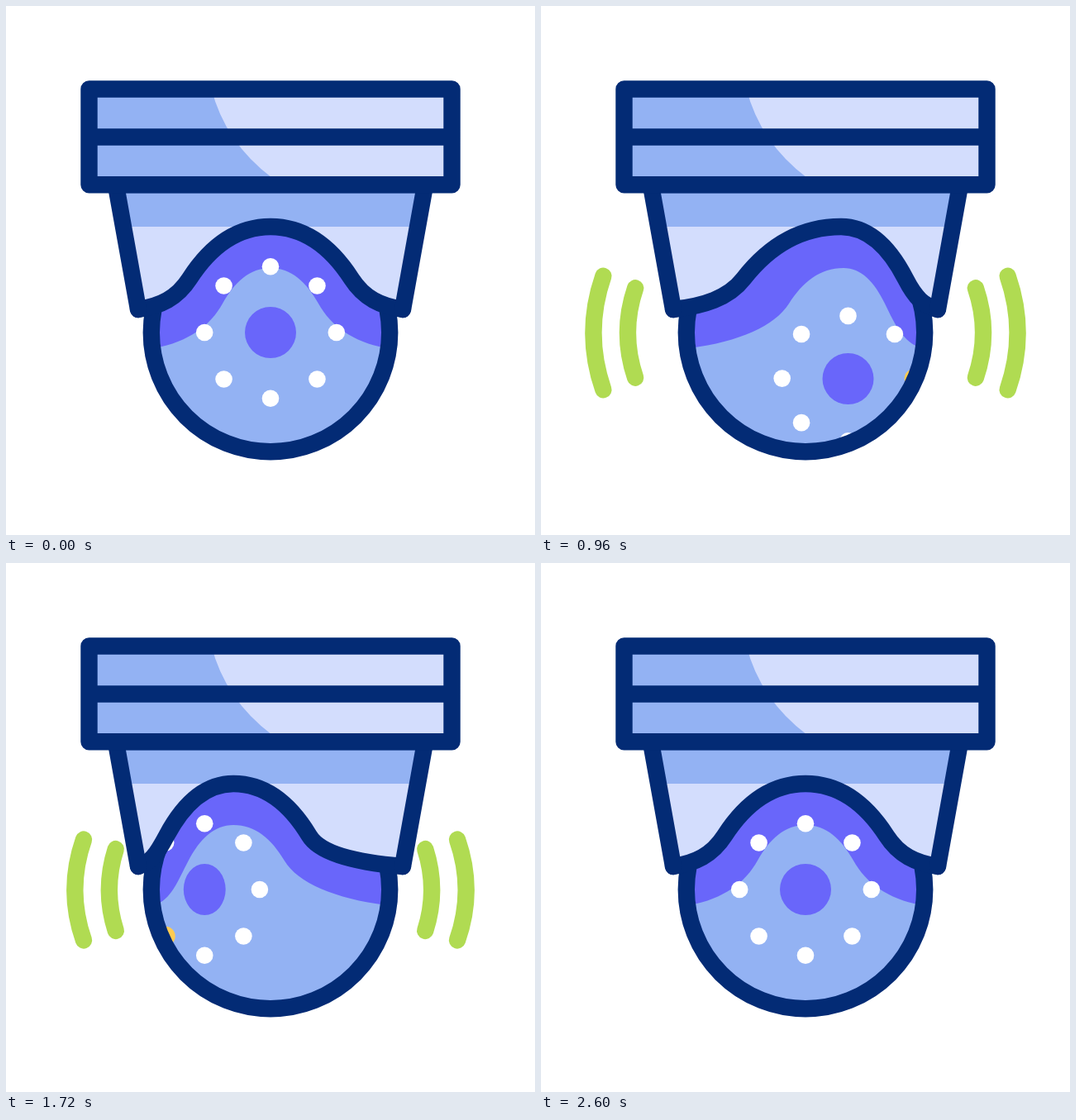
Recreate the animation shown at these times as an HTML page with a canvas. Size 640 by 640 pixels, loop 3000 ms.

```html
<!DOCTYPE html>
<html>
<head>
<meta charset="utf-8">
<style>
  html, body { margin: 0; width: 100%; height: 100%; overflow: hidden; background: #fff; }
  canvas { display: block; }
</style>
</head>
<body>
<canvas id="stage" width="640" height="640"></canvas>
<script>
const ctx = document.getElementById('stage').getContext('2d');
const LOOP = 3000, CX = 320, CY = 395, LINE = 20.4;
const NAVY = '#032b75', BLUE = '#93b2f3', PALE = '#d3ddfd', PURPLE = '#6966fa', GREEN = '#b0db52';
const WHITE = [255, 255, 255], YELLOW = [255, 203, 80];

const clamp = v => Math.min(1, Math.max(0, v));
const ease = (t, from, to) => { const s = clamp((t - from) / (to - from)); return s * s * (3 - 2 * s); };
const hold = (t, a, b, c, d) => ease(t, a, b) - ease(t, c, d);

// A bell-shaped curve: flat feet, two sloping flanks and a round apex.
function bell({ foot, footY, lift, reach, mid, half, flankY, rise, drop, apex, apexY }) {
  const path = new Path2D();
  const x1 = mid - half, x2 = mid + half, end = 640 - foot;
  const a = apex - x1, b = x2 - apex, lean = 0.25;
  path.moveTo(foot, footY);
  path.bezierCurveTo(foot + reach * (x1 - foot), footY - lift,
    x1 - lean * a * drop, flankY + rise * drop, x1, flankY);
  path.bezierCurveTo(x1 + lean * a, flankY - rise, apex - 0.43 * a, apexY, apex, apexY);
  path.bezierCurveTo(apex + 0.43 * b, apexY, x2 - lean * b, flankY - rise, x2, flankY);
  path.bezierCurveTo(x2 + lean * b * drop, flankY + rise * drop,
    end - reach * (end - x2), footY - lift, end, footY);
  return path;
}

const hillCurve = (right, left) => bell({
  foot: 160, footY: 367, lift: 4, reach: 0.43,
  mid: CX + 23 * right - 44 * left, half: 98 - 13 * left, flankY: 330, rise: 38, drop: 0.62,
  apex: CX + 43 * right - 50 * left, apexY: 267
});

const glassCurve = (right, left) => bell({
  foot: 180, footY: 414, lift: 8, reach: 0.5,
  mid: CX + 38 * right - 46 * left, half: 58, flankY: 360, rise: 26, drop: 1.05,
  apex: CX + 46 * right - 50 * left, apexY: 317
});

function below(curve) {
  const area = new Path2D(curve);
  area.lineTo(480, 600);
  area.lineTo(160, 600);
  area.closePath();
  return area;
}

const toPath = shape => typeof shape === 'string' ? new Path2D(shape) : shape;

function fill(color, shape) {
  ctx.fillStyle = color;
  ctx.fill(toPath(shape));
}

function stroke(color, shape) {
  ctx.strokeStyle = color;
  ctx.lineWidth = LINE;
  ctx.stroke(toPath(shape));
}

function oval(x, y, rx, ry = rx) {
  const path = new Path2D();
  path.ellipse(x, y, rx, ry, 0, 0, Math.PI * 2);
  return path;
}

// Each wave travels outwards for two half-second steps.
function drawWaves(t) {
  if (t < 600 || t >= 2600) return;
  for (let n = 0; n < 4; n++) {
    const age = (t - 100 - 500 * n) / 500;
    if (age < 0 || age >= 2) continue;
    const x = 134.8 - 41.5 * age, sag = 7.3 + 2.7 * age;
    const h = 47 + 10 * age + 6.3 * Math.max(0, age - 1);
    for (const at of [v => v, v => 640 - v]) {
      stroke(GREEN, `M${at(x + sag)} ${395.5 - h}Q${at(x - sag)} 395.5 ${at(x + sag)} ${395.5 + h}`);
    }
  }
}

function drawDots(t, x, y, rx, ry) {
  for (let i = 0; i < 8; i++) {
    const angle = i * Math.PI / 4;
    const glow = clamp((160 - Math.abs(t - 600 - 200 * i)) / 40);
    const color = WHITE.map((v, k) => Math.round(v + glow * (YELLOW[k] - v)));
    fill(`rgb(${color})`, oval(x + rx * Math.sin(angle), y - ry * Math.cos(angle), 10.3 + 1.3 * glow));
  }
}

function drawBall(t) {
  const right = hold(t, 200, 600, 1050, 1450);
  const left = hold(t, 1400, 1800, 2060, 2460);
  const x = CX + 51.5 * right - 89 * left, y = CY + 56 * right;
  const hill = hillCurve(right, left);
  const ball = oval(CX, CY, 144.2);

  ctx.save();
  ctx.clip(below(hill));
  ctx.save();
  ctx.clip(ball);
  fill(PURPLE, 'M160 240H480V560H160Z');
  fill(BLUE, below(glassCurve(right, left)));
  fill(PURPLE, oval(x, y, 31 * (1 - 0.2 * left), 31));
  drawDots(t, x, y - 0.4 * right, 79.8 * (1 - 0.184 * left), 79.8 - 4.1 * right);
  ctx.restore();
  stroke(NAVY, ball);
  ctx.restore();
  stroke(NAVY, hill);
}

function drawHousing() {
  fill(PALE, 'M133 216H507L480 367H160Z');
  fill(BLUE, 'M133 216H507L498 267H142Z');
}

function drawMount() {
  stroke(NAVY, 'M160 367L132.8 216H507.2L480 367');
  fill(PALE, 'M100 100H540V216H100Z');
  fill(BLUE, 'M100 100H248.5Q265 165 322 208V216H100Z');
  stroke(NAVY, 'M100.5 100.5H539.5V216.2H100.5ZM100.5 158.5H539.5');
}

function draw(now) {
  const t = now % LOOP;
  ctx.fillStyle = '#fff';
  ctx.fillRect(0, 0, 640, 640);
  ctx.lineCap = ctx.lineJoin = 'round';
  drawWaves(t);
  drawHousing();
  drawBall(t);
  drawMount();
}

let start;
function tick(now) {
  start ??= now;
  draw(Math.max(0, now - start));
  requestAnimationFrame(tick);
}
draw(0);
requestAnimationFrame(tick);
</script>
</body>
</html>
```
